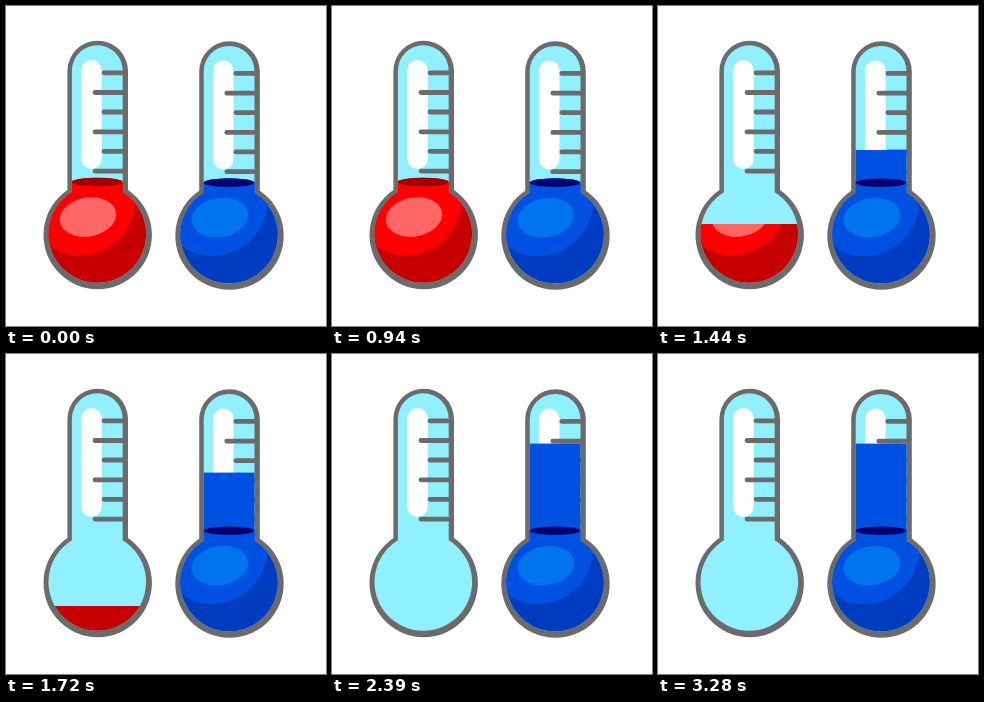
An HTML page that plays this animation: 320x320 px, repeating every 3.34 s.

```html
<!DOCTYPE html>
<html lang="en">
<head>
<meta charset="utf-8">
<title>Thermometers</title>
<style>
html, body { margin: 0; width: 100%; height: 100%; overflow: hidden; background: #fff; }
svg { display: block; width: 100vw; height: 100vh; }
</style>
</head>
<body>
<svg viewBox="0 0 320 320">
  <defs>
    <path id="shell" d="M61.4 184.1V65a30.3 30.3 0 0 1 60.6 0V184.1A54.2 54.2 0 1 1 61.4 184.1Z"/>
    <path id="bore" d="M65.9 186.3V64.7a25.4 25.4 0 0 1 50.8 0V186.3A48.8 48.8 0 1 1 65.9 186.3Z"/>
    <clipPath id="inside"><use href="#bore"/></clipPath>
    <clipPath id="drain"><rect id="redLevel" width="160" height="320"/></clipPath>
    <!-- Keeps the shaded bulb from spilling up the tube. -->
    <clipPath id="rest"><path d="M0 176H65.8A25.4 4.3 0 0 1 116.6 176H160V320H0Z"/></clipPath>
    <g id="glass">
      <use href="#shell" fill="#6b6b6b"/>
      <use href="#bore" fill="#90f0ff"/>
      <rect x="75.3" y="54" width="20.4" height="109" rx="10.2" fill="#fff"/>
      <path d="M98 66.8h21M89 86.5h30M98 106h21M89 125.8h30M98 145.3h21M89 165.1h30"
        stroke="#6b6b6b" stroke-width="4.8" stroke-linecap="round"/>
    </g>
  </defs>
  <g id="hot"></g>
  <g id="cold" transform="translate(131.8 .6)"></g>
</svg>
<script>
const $ = id => document.getElementById(id);

const liquid = (dark, base, light, top) => `
  <g clip-path="url(#rest)">
    <rect width="160" height="320" fill="${dark}"/>
    <ellipse cx="78" cy="199" rx="53" ry="49" transform="rotate(-40 78 199)" fill="${base}"/>
    <ellipse cx="82" cy="211" rx="28.5" ry="19.5" transform="rotate(-10 82 211)" fill="${light}"/>
    <ellipse cx="91.2" cy="176" rx="25.4" ry="4.3" fill="${top}"/>
  </g>`;

const thermometer = content => `
  <use href="#glass"/>
  <g clip-path="url(#inside)">${content}</g>`;

$('hot').innerHTML = thermometer(
  `<g clip-path="url(#drain)">${liquid('#c60000', '#ff0000', '#ff6666', '#a00000')}</g>`);
$('cold').innerHTML = thermometer(
  `<rect id="column" width="160" fill="#0050e2"/>${liquid('#003cc0', '#0050e2', '#0074ee', '#000070')}`);

const LOOP = 3340, FPS = 18;

function draw() {
  const t = performance.now() % LOOP;
  const step = Math.floor((t + 5) * FPS / 1000);
  const p = Math.min(1, Math.max(0, (step - 19.6) / 17.1));
  const blueTop = 176 - 87 * p;
  $('redLevel').setAttribute('y', p ? 174.6 + 116 * p : 0);
  $('column').setAttribute('y', blueTop);
  $('column').setAttribute('height', 180 - blueTop);
  requestAnimationFrame(draw);
}
draw();
</script>
</body>
</html>
```
